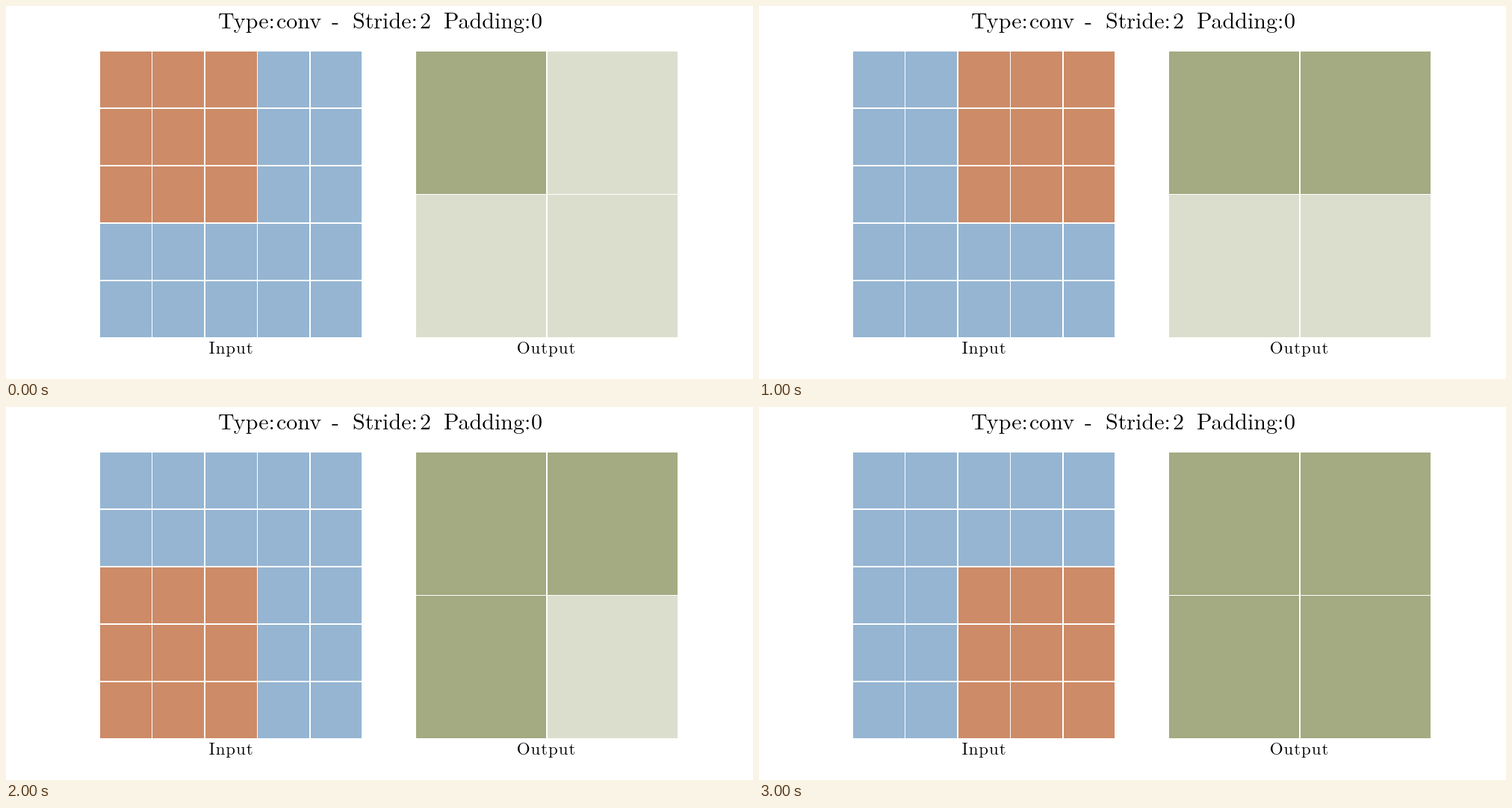
Recreate the animation shown at these times as an HTML page with a canvas. Size 1000 by 500 pixels, loop 4000 ms.

```html
<!DOCTYPE html>
<html lang="en">
<head>
<meta charset="utf-8">
<title>Strided convolution</title>
<style>
  html, body { margin: 0; width: 100%; height: 100%; overflow: hidden; background: #fff; }
  canvas { display: block; }
</style>
</head>
<body>
<canvas id="stage" width="1000" height="500"></canvas>
<script>
const ctx = document.getElementById('stage').getContext('2d');
const SERIF = '"Latin Modern Roman", "CMU Serif", "Liberation Serif", serif';
const STEP = 1000, STRIDE = 2, KERNEL = 3;

// Cell edges as [start, end] along each axis
const input = {
  cols: [[126, 195], [196, 265], [267, 336], [337, 406], [408, 476]],
  rows: [[61, 136], [138, 213], [215, 290], [292, 367], [369, 444]]
};
const output = {
  cols: [[549, 723], [725, 899]],
  rows: [[61, 252], [253, 444]]
};

function drawGrid({ cols, rows }, colour) {
  rows.forEach(([top, bottom], r) => cols.forEach(([left, right], c) => {
    ctx.fillStyle = colour(r, c);
    ctx.fillRect(left, top, right - left, bottom - top);
  }));
}

function drawText(text, x, y, size, align = 'left', spacing = 0) {
  ctx.font = `${size}px ${SERIF}`;
  ctx.letterSpacing = `${spacing}px`;
  ctx.textAlign = align;
  ctx.fillStyle = '#000';
  ctx.fillText(text, x, y);
}

function draw(step) {
  const row = Math.floor(step / 2) * STRIDE, col = step % 2 * STRIDE;
  const covered = (i, start) => i >= start && i < start + KERNEL;

  ctx.fillStyle = '#fff';
  ctx.fillRect(0, 0, 1000, 500);
  drawGrid(input, (r, c) => covered(r, row) && covered(c, col) ? '#cd8b67' : '#95b5d2');
  drawGrid(output, (r, c) => r * 2 + c <= step ? '#a4aa81' : '#dbdecd');

  const title = [['Type:', 284], ['conv', 362], ['-', 436], ['Stride:', 464],
                 ['2', 554], ['Padding:', 586], ['0', 703]];
  title.forEach(([word, x]) => drawText(word, x, 30, 30));
  drawText('Input', 301.5, 466, 23, 'center', 0.9);
  drawText('Output', 723.5, 466, 23, 'center', 0.9);
}

const start = performance.now();
function tick() {
  draw(Math.floor((performance.now() - start) / STEP) % 4);
  requestAnimationFrame(tick);
}
tick();
</script>
</body>
</html>
```
